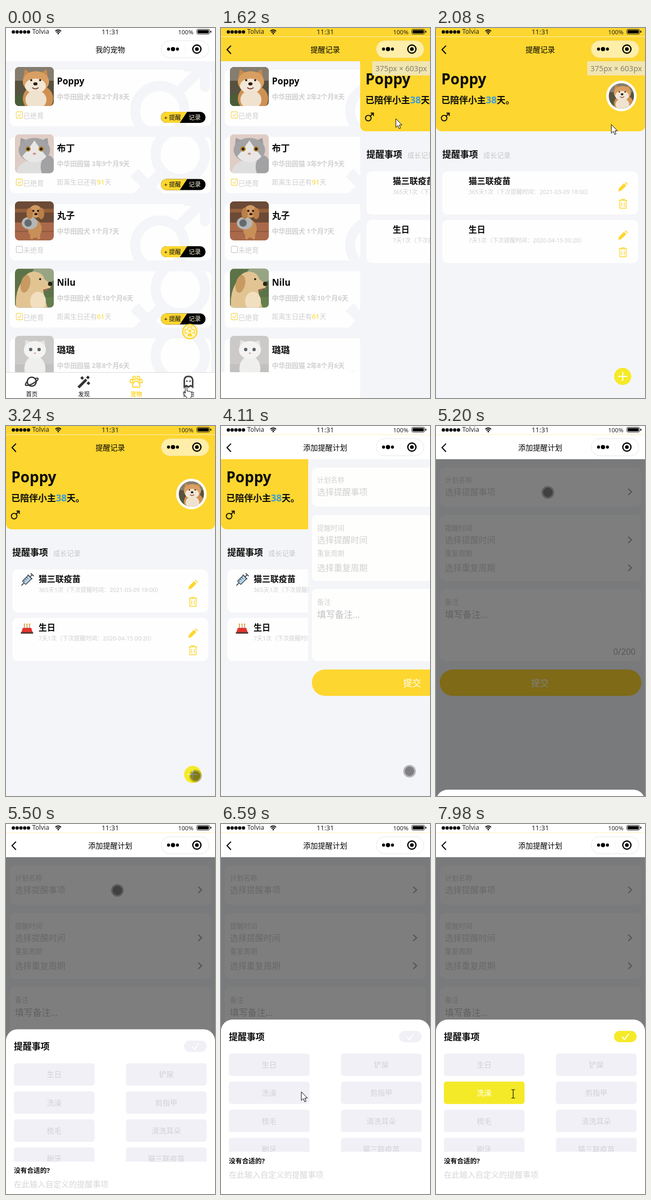
An HTML page for the animation above (8 s loop, 398 by 702 pixels).

```html
<!DOCTYPE html>
<html lang="zh-CN">
<head>
<meta charset="utf-8">
<title>我的宠物</title>
<style>
html, body { margin: 0; width: 100%; height: 100%; overflow: hidden; background: #fff; }
svg { display: block; font-family: "Noto Sans", "Noto Sans CJK SC", "Noto Sans CJK", sans-serif; white-space: pre; }
</style>
</head>
<body>
<svg id="stage" width="398" height="702" viewBox="0 0 398 702"></svg>
<script>
const LOOP = 8000;
const GOLD = '#fdd62f', LEMON = '#f5ea28', PAGE = '#f4f5f8', PALE = '#cfcfcf', INK = '#0b0b0b';
const PET = 'Poppy';

// ---------- drawing helpers ----------
const text = (x, y, s, size, fill = INK, more = '') =>
  `<text x="${x}" y="${y}" font-size="${size}" fill="${fill}" ${more}>${s}</text>`;
const BOLD = 'font-weight="700"', MID = 'text-anchor="middle"', END = 'text-anchor="end"';
const rect = (x, y, w, h, fill, r = 0, more = '') =>
  `<rect x="${x}" y="${y}" width="${w}" height="${h}" rx="${r}" fill="${fill}" ${more}/>`;
const disc = (x, y, r, fill, more = '') => `<circle cx="${x}" cy="${y}" r="${r}" fill="${fill}" ${more}/>`;
const oval = (x, y, rx, ry, fill, more = '') =>
  `<ellipse cx="${x}" cy="${y}" rx="${rx}" ry="${ry}" fill="${fill}" ${more}/>`;
const shape = (d, fill, more = '') => `<path d="${d}" fill="${fill}" ${more}/>`;
const line = (d, color, w = 2, more = '') =>
  `<path d="${d}" fill="none" stroke="${color}" stroke-width="${w}" ${more}/>`;
const ROUND = 'stroke-linecap="round" stroke-linejoin="round"';
const at = (x, y, body, more = '') => `<g transform="translate(${x} ${y})" ${more}>${body}</g>`;
const layer = (id, body) => `<g id="${id}">${body}</g>`;

// ---------- pet pictures, 74 x 74 ----------
const photos = [
  rect(0, 0, 74, 74, '#57513f') + rect(0, 0, 74, 26, '#857d6e') + oval(8, 66, 16, 14, '#4a5c38') +
    oval(44, 60, 29, 26, '#cf9152') + shape('M15 26 19 4 33 14H47L60 4 64 28Z', '#c98a4d') +
    oval(40, 28, 25, 20, '#d99f62') + oval(39, 36, 20, 14, '#f2e6d6') + oval(40, 62, 20, 18, '#efe2cf') +
    disc(31, 25, 2, '#2b1c14') + disc(48, 25, 2, '#2b1c14') + oval(39, 32, 4, 3, '#2b1c14') +
    line('M33 39Q39 44 45 39', '#7d4136', 2),
  rect(0, 0, 74, 74, '#dfcdc5') + oval(40, 72, 36, 24, '#dedede') + oval(63, 62, 14, 22, '#a2a2a4') +
    shape('M9 30 11 7 26 13H48L62 7 65 30Z', '#9c9c9f') + oval(37, 30, 30, 23, '#a3a3a6') +
    shape('M37 12 50 30 60 42Q52 53 37 54 22 53 14 42L24 30Z', '#e9e7e5') + disc(25, 28, 5, '#b0802f') +
    disc(50, 28, 5, '#b0802f') + disc(25, 28, 2.5, '#1e1b18') + disc(50, 28, 2.5, '#1e1b18') +
    oval(37, 37, 3, 2, '#cf9488'),
  rect(0, 0, 74, 74, '#a9694a') + rect(0, 0, 74, 40, '#6b4a36') + rect(0, 14, 74, 7, '#94603c') +
    rect(0, 56, 74, 2, '#8d5a40') + oval(38, 52, 13, 17, '#c98f58') + oval(28, 41, 15, 12, '#b4b7b6') +
    oval(25, 41, 7, 7, '#636b6e') + disc(39, 19, 12, '#d29a62') + oval(28, 23, 6, 11, '#bb7f48') +
    oval(50, 23, 6, 11, '#bb7f48') + disc(35, 18, 2, '#251a14') + disc(44, 18, 2, '#251a14') +
    oval(40, 24, 3, 2, '#251a14') + rect(29, 58, 6, 14, '#c98f58', 3) + rect(42, 58, 6, 14, '#c98f58', 3),
  rect(0, 0, 74, 74, '#5c7348') + oval(58, 10, 26, 16, '#98a585') + rect(0, 54, 74, 20, '#657f4c') +
    shape('M2 74Q0 42 14 24 22 4 40 6 53 8 56 20L69 30Q69 41 54 42 57 60 62 74Z', '#e2c493') +
    oval(20, 29, 9, 17, '#c79a62', 'transform="rotate(12 20 29)"') + oval(44, 62, 15, 18, '#f1dfc0') +
    disc(48, 20, 2, '#2c2019') + oval(67, 29, 4, 4, '#2c2019') + line('M54 41 66 38', '#8e4f42', 2),
  rect(0, 0, 74, 74, '#cbcac8') + rect(0, 54, 74, 20, '#c2c1bf') + oval(38, 62, 20, 24, '#efefee') +
    shape('M18 26 20 8 32 12H46L56 8 59 26Z', '#e6e4e2') + oval(38, 27, 21, 17, '#f4f3f2') +
    disc(30, 26, 3.2, '#59656c') + disc(46, 26, 3.2, '#59656c') + oval(38, 33, 2, 1.5, '#d7a69f')
];
const photo = i => `<g clip-path="url(#snap)">${photos[i]}</g>`;

// ---------- list page ----------
const male = disc(293, 78, 47, 'none', `stroke="${PAGE}" stroke-width="19"`) +
  line('M328 42 377 -5M344 -6H379V33', PAGE, 19, ROUND);
const female = disc(332, 33, 47, 'none', `stroke="${PAGE}" stroke-width="19"`) +
  line('M300 65 238 127M244.500 68 297 120', PAGE, 21);

function petCard(i, name, kind, age, isMale, days) {
  const done = i !== 2;
  return at(0, 79 + 127.5 * i,
    rect(7, 0, 384, 107, '#fefefe', 10) + `<g clip-path="url(#card)">${isMale ? male : female}</g>` +
    at(17, -5, photo(i)) + text(97, 27.5, name, 17, INK, BOLD) +
    text(97, 55.5, `中华田园${kind}  ${age}`, 12.6, '#d0d0d0', BOLD) +
    rect(19.500, 80, 12, 12, 'none', 2, `stroke="${done ? '#f8d966' : '#cfcfcf'}" stroke-width="1.3"`) +
    (done ? line('M22.500 86 25 88.500 29 83.500', '#f8d966', 1.3) : '') +
    text(33, 92.3, done ? '已绝育' : '未绝育', 13, PALE) +
    (days ? text(97, 90.3, `距离生日还有<tspan fill="${GOLD}">${days}</tspan>天`, 12.7, PALE) : '') +
    rect(295, 80, 85, 21, '#000', 10.5) +
    shape('M305.500 80H345L331 101H305.500A10.500 10.500 0 0 1 305.500 80Z', GOLD) +
    text(301, 94.600, '+ 提醒', 11.4) + text(348, 94.600, '记录', 11.4, '#fff8dc'));
}

const list = rect(0, 63, 398, 590, PAGE) +
  petCard(0, PET, '犬', '2年2个月8天', true) +
  petCard(1, '布丁', '猫', '3年9个月9天', false, 91) +
  petCard(2, '丸子', '犬', '1个月7天', true) +
  petCard(3, 'Nilu', '犬', '1年10个月6天', false, 61) +
  petCard(4, '璐璐', '猫', '2年8个月6天', false);

const helper = at(350, 576, disc(0, 0, 13.5, '#fff6d0', `stroke="${GOLD}" stroke-width="2.5"`) +
  line('M-3.500 -9H3.500V-4H9V3H4M-4 3H-9V-4H-3.500V-9', GOLD, 1.6) +
  disc(0, -1, 2.5, GOLD) + shape('M-4 9V5Q0 1 4 5V9Z', GOLD));

const star = (x, y, r) => shape(`M${x} ${y - r}L${x + r} ${y} ${x} ${y + r} ${x - r} ${y}Z`, '#333');
const tabs = rect(0, 653, 398, 49, '#fff') + rect(0, 653, 398, 1, '#dcdcdc') +
  disc(49, 671, 8.5, '#fff', 'stroke="#333" stroke-width="2.5"') +
  line('M41 670Q35 677 38 678 44 679 53 673.500 62 668 61 665 60 663.500 56 665', '#333', 2.2) +
  line('M138 682 153 667', '#333', 5) + star(145, 664, 3.5) + star(156, 663, 3.5) + star(157, 674, 3.5) +
  [[239, 670], [244, 664], [252, 664], [257, 670]].map(([x, y]) =>
    oval(x, y, 2.6, 3.4, '#fff', `stroke="${GOLD}" stroke-width="1.9"`)).join('') +
  line('M248 670Q252 670 254 675 257 682 252 682 248 680 244 682 239 682 242 675 244 670 248 670Z', GOLD, 2) +
  line('M339.500 681V668Q340 661 347.500 661 355 661 355.500 668V681L351.500 678.500 347.500 681 343.500 678.500Z', '#444', 3) +
  disc(344.5, 670, 1.6, '#444') + disc(350.5, 670, 1.6, '#444') +
  ['首页', '发现', '宠物', '我的'].map((s, i) =>
    text(49 + 99.5 * i, 698.5, s, 11, i === 2 ? GOLD : INK, MID + (i === 2 ? ' ' + BOLD : ''))).join('');

// ---------- reminder page ----------
const syringe = `<g transform="translate(40 292) rotate(45)">` +
  line('M0 15V9M0 -9V-14M-4 -14H4M-6 -8H6', '#3c4650', 1.8) +
  rect(-4.5, -8, 9, 16, '#b9d8ee', 1.5, 'stroke="#3c4650" stroke-width="1.5"') +
  line('M-4 -3H0M-4 1H0M-4 5H0', '#3c4650', 1) + '</g>';
const cake = line('M35 377V384M40 376V384M45 377V384', '#c99a5b', 1.6) +
  [35, 40, 45].map(x => disc(x, 376, 1.3, '#f29a2e')).join('') +
  shape('M32 383H48L51 392H29Z', '#e0352f') + rect(28, 391, 24, 3, '#5a3a34', 1.5);
const tools = y => at(356, y,
  shape('M-9 9-7.500 3 2 -6.500 6.500 -2-3 7.500Z', GOLD) + shape('M3.500 -8 5 -9.300 9.300 -5 8 -3.500Z', GOLD) +
  line('M-8 26H8M-3 26V24H3V26M-6 26.500V41H6V26.500M-2.500 30V38M2.500 30V38', GOLD, 1.4));
const task = (y, name, note) => rect(12, y, 373, 82, '#fefefe', 10) +
  text(62, y + 23.5, name, 16, INK, BOLD) + text(62, y + 43, note, 11, '#cfcfcf') + tools(y + 29);

const remind = rect(0, 63, 398, 639, PAGE) +
  shape('M0 63H398V184Q398 196 386 196H12Q0 196 0 184Z', GOLD) +
  text(10, 107, PET, 28, INK, BOLD) +
  text(10, 143, '已陪伴小主<tspan font-size="18" fill="#3b9bd6">38</tspan>天。', 17, INK, BOLD) +
  disc(15.5, 171, 5.3, 'none', `stroke="${INK}" stroke-width="1.8"`) +
  line('M19.500 167 25 161.500M20 161.500H25.300V167', INK, 1.8) +
  disc(353, 129, 29, '#fff') +
  `<g clip-path="url(#face)"><g transform="translate(329 105) scale(.65)">${photos[0]}</g></g>` +
  text(12, 246, '提醒事项', 17, INK, BOLD) + text(90, 246, '成长记录', 13, '#c6c6c6') +
  task(272, '猫三联疫苗', '365天1次（下次提醒时间：2021-03-09 18:00）') +
  task(364, '生日', '7天1次（下次提醒时间：2020-04-15 00:20）') +
  layer('emoji', syringe + cake) +
  disc(355.5, 661, 16.3, LEMON) + line('M347 661H364M355.500 652.500V669.500', '#fff', 2);

// ---------- new plan page ----------
const more = y => line(`M366 ${y - 6}L372.500 ${y} 366 ${y + 6}`, '#a6a6a6', 2);
const plan = rect(0, 63, 398, 639, PAGE) +
  [[79, 74], [169, 125], [309, 137]].map(([y, h]) => rect(7, y, 384, h, '#fefefd', 10)).join('') +
  [[107, '计划名称'], [198, '提醒时间'], [246, '重复周期'], [338, '备注']].map(([y, s]) => text(17, y, s, 13, '#d2d2d2')).join('') +
  [[131, '选择提醒事项'], [222, '选择提醒时间'], [275, '选择重复周期']].map(([y, s]) => text(17, y, s, 16, '#d0d0d0')).join('') +
  more(125) + more(216) + more(269) +
  text(17, 364, '填写备注...', 17, '#c0c0c2') + text(380, 434, '0/200', 16, '#b0b0b0', END) +
  rect(7, 462, 384, 50, GOLD, 25) + text(198, 494, '提交', 17, '#fff', MID);

// ---------- bottom sheet, its top edge at y = 0 ----------
const choice = (i, s, fill, ink) => {
  const x = i % 2 ? 228.5 : 15, y = 64.5 + 53.3 * (i >> 1);
  return rect(x, y, 153.5, 42.5, fill, 5) + text(x + 76.7, y + 26.5, s, 14, ink, MID);
};
const tick = fill => rect(339, 21.5, 43, 21.5, fill, 10.7) + line('M354.500 33 359 38 367 27', '#fff', 2);
const sheet = rect(0, 0, 398, 400, '#fff', 22) + text(15, 39, '提醒事项', 17, INK, BOLD) + tick('#f0f0f6') +
  '<g clip-path="url(#rows)">' +
  ['生日', '铲屎', '洗澡', '剪指甲', '梳毛', '清洗耳朵', '刷牙', '猫三联疫苗']
    .map((s, i) => choice(i, s, '#f0f0f6', '#d2d2d4')).join('') + '</g>' +
  layer('picked', tick(LEMON) + choice(2, '洗澡', LEMON, '#fff')) +
  text(15, 273, '没有合适的?', 12.5, INK, BOLD) + text(15, 300, '在此输入自定义的提醒事项', 15, '#d6d6d6');

// ---------- status and navigation bars ----------
const bars = '<rect id="bar" width="398" height="63"/>' + layer('seam', rect(0, 16, 398, 1, '#fff0b8')) +
  [0, 1, 2, 3, 4].map(i => disc(14 + 7.2 * i, 7.5, 3.2, INK)).join('') + text(50, 11.3, 'Tolvia', 12, '#222') +
  line('M94 6Q99.500 1.500 105 6M96 8.500Q99.500 5.500 103 8.500', INK, 1.7) + disc(99.500, 10.500, 1.5, INK) +
  text(198.5, 12, '11:31', 13, '#222', MID) + text(357, 11.5, '100%', 11.5, '#222', END) +
  rect(363.5, 2.5, 24, 9, 'none', 2, 'stroke="#111"') + rect(365, 4, 21, 6, '#000', 1) + rect(389, 5, 2, 4, '#111', 1) +
  line('M19 33.500 11.500 41 19 49', INK, 2.1, 'id="back"') + '<text id="title" x="198.5" y="46" font-size="14" text-anchor="middle"/>' +
  '<rect id="pill" x="295.5" y="24" width="91" height="32.5" rx="16.2"/>' + rect(341, 31, 1, 18, '#ececec', 0, 'opacity=".6"') +
  disc(309.5, 40, 2.9, '#000') + disc(318, 40, 4, '#000') + disc(326.5, 40, 2.9, '#000') +
  disc(363.5, 40, 7.8, 'none', 'stroke="#000" stroke-width="2.4"') + disc(363.5, 40, 3.5, '#000');

const touch = disc(0, 0, 12, '#000', 'opacity=".25"') + disc(0, 0, 9, '#000', 'opacity=".3"');
const outline = 'stroke="#000" stroke-width="1" stroke-linejoin="round"';

document.getElementById('stage').innerHTML =
  `<defs><clipPath id="snap">${rect(0, 0, 74, 74, '#000', 8)}</clipPath>` +
  `<clipPath id="card">${rect(7, 0, 384, 107, '#000', 10)}</clipPath>` +
  `<clipPath id="face">${disc(353, 129, 24, '#000')}</clipPath>` +
  `<clipPath id="rows">${rect(0, 60, 398, 191, '#000')}</clipPath>` +
  `<clipPath id="body">${rect(0, 63, 398, 590, '#000')}</clipPath></defs>` +
  rect(0, 0, 398, 702, '#fff') + `<g clip-path="url(#body)">${list}</g>` +
  layer('tabs', helper + tabs) + layer('remind', remind) + layer('plan', plan) + bars +
  layer('tapLow', touch) + layer('shade', rect(0, 63, 398, 639, '#000', 0, 'opacity=".5"')) +
  layer('sheet', sheet) +
  layer('size', rect(288, 63, 110, 27, '#efe9d2', 0, 'opacity=".8"') + text(294, 82, '375px × 603px', 14.5, '#85826f')) +
  layer('tapTop', touch) +
  layer('hand', shape('M-1.700 11V1.500A1.700 1.700 0 0 1 1.700 1.500V8Q4.500 6.800 5 8.600 8 7.600 8.400 9.600 11 9 11 11.500V15Q10.500 18.500 9 20V22H1V20Q-2.500 16.500 -5.500 11.500 -5.500 9.300 -1.700 12Z', '#fff', outline)) +
  layer('arrow', shape('M0 0V16.500L3.800 13 6.400 19 9 17.800 6.500 12H11.500Z', '#fff', outline)) +
  layer('beam', line('M-3.500 -8H-1Q0 -8 0 -7 0 -8 1 -8H3.500M0 -7V7M-3.500 8H-1Q0 8 0 7 0 8 1 8H3.500', '#111', 1.2));

// ---------- timing ----------
const el = {};
document.querySelectorAll('[id]').forEach(n => el[n.id] = n);
const show = (id, on) => el[id].setAttribute('display', on ? 'inline' : 'none');
const move = (id, x, y) => el[id].setAttribute('transform', `translate(${x} ${y})`);
const clamp = v => Math.max(0, Math.min(1, v));
const slideX = (t, start) => Math.round(398 * Math.pow(1 - clamp((t - start) / 300), 3));

// CSS "ease" curve, solved by bisection
function ease(x) {
  const bez = (u, a, b) => 3 * u * (1 - u) * (1 - u) * a + 3 * u * u * (1 - u) * b + u * u * u;
  let lo = 0, hi = 1;
  for (let i = 0; i < 20; i++) {
    const m = (lo + hi) / 2;
    if (bez(m, .25, .25) < x) lo = m; else hi = m;
  }
  return bez(lo, .1, 1);
}

const ticks = [[0, 0, 1], [70, 760, 10], [920, 990, 2], [1150, 1150, 1], [1620, 2400, 11], [2460, 2860, 6],
  [3240, 4020, 11], [4110, 4880, 11], [4950, 4950, 1], [5120, 5890, 11], [5980, 6590, 9], [6820, 7600, 11], [7680, 7980, 5]]
  .flatMap(([a, b, n]) => Array.from({ length: n }, (_, i) => n > 1 ? a + (b - a) * i / (n - 1) : a));
const snapTime = t => ticks.reduce((best, k) => k <= t + 8 ? k : best, 0);

const route = [[0, 343, 681], [400, 321, 400], [760, 331, 170], [1000, 331, 170], [1150, 333, 172], [1900, 333, 172],
  [2400, 336, 207], [2860, 361, 657], [3240, 361, 664], [3800, 361, 664], [4110, 359, 655], [4300, 358, 650],
  [4880, 213, 126], [5200, 213, 126], [5580, 212, 126], [5900, 256, 548], [6590, 153, 508], [6820, 153, 508],
  [7150, 260, 520], [7600, 147, 512], [8000, 147, 512]];
function cursorAt(t) {
  const i = Math.max(1, route.findIndex(p => p[0] >= t));
  const [t0, x0, y0] = route[i - 1], [t1, x1, y1] = route[i];
  const k = clamp((t - t0) / (t1 - t0)), s = k * k * (3 - 2 * k);
  return [x0 + (x1 - x0) * s, y0 + (y1 - y0) * s];
}

function draw(now) {
  const t = snapTime(now % LOOP);
  const page = t < 1150 ? 0 : t < 3550 ? 1 : 2;
  const gold = page === 1;

  el.bar.setAttribute('fill', gold ? GOLD : '#fff');
  el.pill.setAttribute('fill', gold ? '#feeea8' : '#fff');
  el.pill.setAttribute('stroke', gold ? '#f6e08c' : '#e6e6e6');
  el.title.textContent = ['我的宠物', '提醒记录', '添加提醒计划'][page];
  show('seam', page > 0);
  show('back', page > 0);
  show('tabs', page === 0);
  show('size', t >= 1150 && t < 2150);

  move('remind', slideX(t, 1582), 0);
  move('plan', slideX(t, 4034), 0);
  show('emoji', t >= 2450);

  show('shade', t >= 5115);
  move('sheet', 0, 702 - 331 * ease(clamp((t - 5172) / 470)));
  el.picked.setAttribute('opacity', clamp((t - 7610) / 220));

  const [x, y] = cursorAt(t);
  const low = t >= 915 && t < 1150 || t >= 3235 && t < 4260 || t >= 4945 && t < 5570;
  const top = t >= 7590 && t < 7670;
  const beam = t >= 7670;
  const hand = t < 700;
  ['tapLow', 'tapTop', 'hand', 'arrow', 'beam'].forEach(id => move(id, x, y));
  show('tapLow', low);
  show('tapTop', top);
  show('beam', beam);
  show('hand', hand);
  show('arrow', !low && !top && !beam && !hand);
}

const begin = performance.now();
function loop() {
  draw(performance.now() - begin);
  requestAnimationFrame(loop);
}
loop();
</script>
</body>
</html>
```
